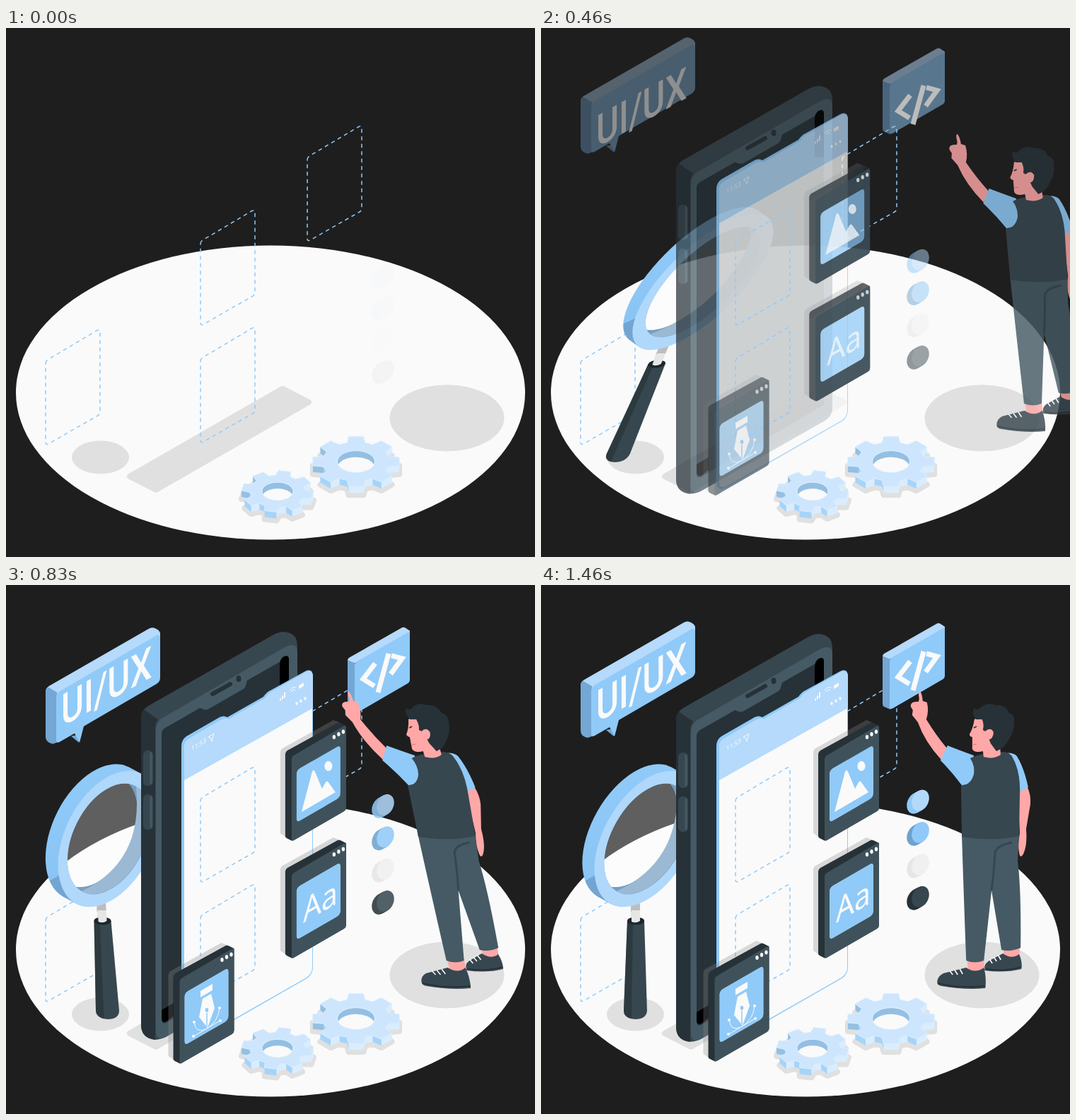
These frames come from a looping animation (748x748 px, 1.5 s). An HTML page:

```html
<!DOCTYPE html>
<html lang="en">
<head>
<meta charset="utf-8">
<title>App design</title>
<style>
html, body { margin: 0; height: 100%; overflow: hidden; background: #1e1e1e; }
svg { display: block; width: 100vw; height: 100vh; }
.fade, .up, .down, .layers > * { opacity: var(--eased); }
.up { transform: translateY(calc((1 - var(--eased)) * 45px)); }
.down { transform: translateY(calc((var(--eased) - 1) * 45px)); }
.right { transform: translateX(calc((var(--eased) - 1) * 45px)); }
.rise { opacity: var(--linear); transform: translateY(calc((1 - var(--linear)) * 45px)); }
.layers > .shade { opacity: calc(var(--eased) * .3); }
.skin { fill: #ffa8a7; }
.blue { fill: #90caf9; }
.pale { fill: #b5dafb; }
.dark { fill: #263238; }
.slate { fill: #37474f; }
.steel { fill: #455a64; }
.white { fill: #fafafa; }
.line { fill: none; stroke: #fafafa; }
</style>
</head>
<body>
<svg id="stage" viewBox="0 0 748 748">
  <defs>
    <path id="slot" d="M0 4q0-3 3-5L72-42q5-3 5 1V73q0 3-3 5L4 118q-4 2-4-2z"
      fill="none" stroke="#90caf9" stroke-width="1.5" stroke-dasharray="5.5 5"/>
    <g id="card" class="layers" fill-rule="evenodd">
      <path class="shade" fill="#888" d="M-7 41Q-7 38-4 36L68-4l8 3V8L0 50V161l-7-5z"/>
      <path class="dark" d="M0 44q0-3 3-5L74 0q2-1 4 0l8 4q0 20 0 116 0 3-3 5l-71 41q-2 1-4 0l-6-3q-2-1-2-3zM16 73V135q0 6 5 3l52-30q5-3 5-9V37q0-6-5-3L21 64q-5 3-5 9z"/>
      <path fill="#3f525b" d="M9 51q0-3 3-5L82 5q4-2 4 2V120q0 3-3 5l-71 41q-3 1-3-2zM16 73V135q0 6 5 3l52-30q5-3 5-9V37q0-6-5-3L21 64q-5 3-5 9z"/>
      <path class="blue" d="M16 73q0-6 5-9L73 34q5-3 5 3V99q0 6-5 9L21 138q-5 3-5-3z"/>
      <g class="white"><ellipse cx="69" cy="20" rx="2.2" ry="3"/><ellipse cx="75.500" cy="16" rx="2.2" ry="3"/><ellipse cx="82" cy="12.500" rx="2.2" ry="3"/></g>
    </g>
    <linearGradient id="ring" x2="0" y2="1">
      <stop stop-color="#90caf9"/><stop offset=".6" stop-color="#8ac4f5"/>
      <stop offset=".6" stop-color="#73a5d2"/><stop offset="1" stop-color="#73a5d2"/>
    </linearGradient>
  </defs>

  <ellipse class="white" cx="374" cy="515.500" rx="360" ry="208"/>
  <g fill="#e0e0e0" stroke="#e0e0e0" stroke-linejoin="round">
    <ellipse cx="133.500" cy="607" rx="40" ry="23"/>
    <ellipse cx="623.500" cy="551.500" rx="80.500" ry="46.500"/>
    <path stroke-width="8" d="M175 634L391 510 428 529 212 653z"/>
  </g>
  <g id="gears"></g>
  <use href="#slot" x="56" y="470"/>
  <use href="#slot" x="426" y="182"/>

  <g id="lens">
    <path fill="#e6e6e6" d="M127 450h13v29h-13z"/><path fill="#bdbdbd" d="M127 450h13v10l-13 2z"/>
    <path class="slate" d="M122 475Q134 467 146 475L150 602Q149 614 133 614 117 613 117 602z"/>
    <path class="dark" opacity=".6" d="M122 475l8 4-2 134q-11-3-11-11z"/>
    <ellipse cx="134" cy="475" rx="12" ry="5.500" fill="#1c262b"/>
    <path fill="#e6e6e6" d="M128 460h12v15q-6 4-12 1z"/>
    <g transform="matrix(.866 -.5 0 1 150 359)">
      <path fill="#fff" opacity=".29" d="M37.600-59.100A70 70 0 0 1-58.400 38.700 70 70 0 0 1 37.600-59.100z"/>
      <path fill="url(#ring)" fill-rule="evenodd" d="M60.200-61.400A86 86 0 0 1-60.200 61.400l-20.800-20.400A86 86 0 0 1 39.400-81.800zM37.600-59.100A70 70 0 0 1-58.400 38.700 70 70 0 0 1 37.600-59.100z"/>
      <path fill="#759fc4" d="M37.600-59.100A70 70 0 1 1-58.400 38.700 70 70 0 0 0 37.600-59.100z"/>
      <path fill="#9bb9d3" d="M49-50A70 70 0 0 1-50 49Q55 60 49-50z"/>
      <circle r="78" fill="none" stroke="#b0d8fb" stroke-width="16"/>
    </g>
  </g>

  <g class="up">
    <path class="slate" d="M191 190Q191 180 201 174L377 74Q392 65 405 73 412 77 412 90V523Q412 536 402 542L226 642Q212 649 201 643 191 638 191 625z"/>
    <path class="dark" d="M191 190Q191 184 195 179L215 193Q211 199 211 206V646Q191 644 191 625z"/>
    <path class="steel" d="M212 208Q212 197 221 191L394 91Q412 82 412 98V523Q412 536 402 542L226 642Q212 648 212 634z"/>
    <path class="dark" d="M220 214Q220 208 225 205L274 177 280 179Q284 180 287 178L334 151Q338 149 339 145L341 138 390 110Q400 104 400 113V520L228 621Q220 626 220 616z"/>
    <path d="M387 117V170H400V108Q400 101 393 104 387 107 387 117zM220 604l17-10v18l-10 8q-7 3-7-5z"/>
    <path d="M292 157L317 143" fill="none" stroke="#263238" stroke-width="6" stroke-linecap="round"/>
    <ellipse class="dark" cx="329" cy="135.500" rx="3.500" ry="4.500"/>
    <rect class="slate" x="194" y="237" width="14" height="50" rx="6"/>
    <rect class="slate" x="194" y="299" width="14" height="50" rx="6"/>
    <path d="M205 241v42M205 303v42" stroke="#455a64" stroke-width="3" stroke-linecap="round"/>
  </g>

  <g class="fade">
    <path class="blue" d="M248 228Q248 219 255 214L302 187Q308 184 313 187L364 158Q369 151 374 149L423 122Q434 117 434 130V541Q434 550 426 556L262 650Q248 656 248 642z"/>
    <path class="white" d="M252 230Q252 222 258 218L304 191Q310 188 315 190L367 160Q371 153 376 151L425 123Q433 120 433 130V541Q433 549 425 555L262 648Q252 652 252 642z"/>
    <path class="pale" d="M252 276V230Q252 222 258 218L304 191Q310 188 315 190L367 160Q371 153 376 151L425 123Q434 119 434 130V174z"/>
    <g class="white">
      <text transform="matrix(.866 -.5 0 1 262 235)" font-family="Noto Sans, sans-serif" font-size="9.500">11:53</text>
      <path d="M387 164v-3l2-1v3zM390 162v-5l2-1v5zM393 160v-8l2-1v8zM414 142l7-4v5l-7 4z"/>
      <ellipse cx="411" cy="167.500" rx="1.700" ry="2.200"/><ellipse cx="417" cy="164" rx="1.700" ry="2.200"/><ellipse cx="423" cy="160.500" rx="1.700" ry="2.200"/>
    </g>
    <path class="line" d="M286 215l8-5-3 11-2-5zM401 149q4-6 9-4M403 151q3-4 6-3"/>
  </g>
  <use href="#slot" x="275" y="301"/>
  <use href="#slot" x="275" y="467"/>

  <g class="right">
    <use href="#card" x="392" y="195"/>
    <use href="#card" x="392" y="361"/>
    <g class="layers white">
      <path d="M415 321L430 264Q432 260 434 264L444 288 449 279Q451 276 453 279L463 293z"/>
      <ellipse cx="453" cy="256" rx="5.500" ry="7"/>
      <text transform="matrix(.866 -.5 0 1 417 478)" font-family="Noto Sans, sans-serif" font-size="47">Aa</text>
    </g>
  </g>
  <g class="down">
    <use href="#card" x="236.500" y="507"/>
    <path class="white" d="M275 571l17-10v9l-17 10zM278 582l12-7 5 20-10 28-12-15z"/>
    <path d="M284 621V602" stroke="#90caf9" stroke-width="1.500"/>
    <ellipse class="blue" cx="284" cy="598" rx="2.300" ry="3"/>
    <path class="line" d="M264 636L303 613M266 615Q268 632 283 625 300 615 302 595"/>
    <g class="white"><circle cx="265" cy="635" r="2"/><circle cx="303" cy="613" r="2"/><circle cx="266" cy="615" r="2"/><circle cx="302" cy="595" r="2"/></g>
  </g>

  <g class="down"><g class="down">
    <g class="down">
      <path class="pale" d="M56 142Q56 137 61 134L202 53Q207 50 212 53 218 56 218 60V72L71 146z"/>
      <path fill="#74a7d4" d="M56 142Q56 138 60 136L72 143V214L66 216Q56 214 56 206z"/>
      <path fill="#74a7d4" d="M92 205l11 9 4-12z"/>
      <path class="blue" d="M71 150Q71 145 75 142L212 63Q218 60 218 66V122Q218 128 213 131L110 191 104 214 97 201 76 213Q71 216 71 210z"/>
    </g>
    <text class="white" transform="matrix(.78 -.43 0 1 78 195)" font-family="Roboto, sans-serif" font-size="63" font-weight="500">UI/UX</text>
  </g></g>

  <g class="down">
    <g class="down">
      <path class="pale" d="M483 101Q483 98 487 96L559 55Q562 53 565 55L571 59V70L493 105z"/>
      <path fill="#74a7d4" d="M483 101l11 4v71l-9-4q-2-1-2-4z"/>
      <path class="blue" d="M493 109Q493 105 497 102L567 62Q571 59 571 64V128Q571 132 567 134L498 174Q493 177 493 172z"/>
    </g>
    <path class="line" stroke-width="7" d="M522 108L505 130 521 140M526 149L541 94M545 97L560 101 544 123"/>
  </g>
  <g class="rise" id="swatches"></g>

  <g id="person">
    <path class="skin" d="M653 511L677 510 676 530 655 530zM602 528L626 527 627 549 604 548z"/>
    <path class="slate" d="M627 541Q627 534 636 530L653 521Q665 530 676 522 681 534 679 543 655 549 627 545z"/>
    <path class="slate" d="M560 562Q560 553 569 549L601 541Q614 550 626 541 630 555 628 570 600 573 566 567 560 566 560 562z"/>
    <path fill="none" stroke="#263238" stroke-width="2" d="M561 563Q590 571 628 567M629 543Q655 547 679 540"/>
    <path class="line" stroke-width="1.600" d="M578 546l4 5M585 545l4 6M592 543l4 7M634 529l4 6M640 526l4 6M646 523l4 7"/>
    <path class="steel" d="M595 352H676L674 390Q679 430 678 513 664 519 651 516L637 432 626 531Q613 536 601 531 598 450 595 352z"/>
    <path fill="none" stroke="#37474f" stroke-width="3" d="M666 364Q645 368 642 378 641 400 637 432"/>
    <path class="skin" d="M674 289L688 286Q693 297 692 310L686 345Q688 370 681 382 677 387 676 378 674 370 677 350z"/>
    <path class="blue" d="M655 238Q668 236 673 242 683 258 689 286 682 291 674 292z"/>
    <path class="skin" d="M575 232Q559 213 545 190 549 178 546 166L540 164Q539 153 536 150 533 150 535 161L534 165Q522 164 523 172L526 177 525 184Q530 190 533 194 543 222 566 247z"/>
    <path class="blue" d="M575 227Q590 233 612 241L614 272Q608 284 595 283 580 263 565 248z"/>
    <path class="slate" d="M607 245Q614 241 625 239L650 236Q663 235 667 244 679 265 677 300L676 355Q640 363 595 356L594 283Q607 284 612 268 614 255 607 245z"/>
    <path class="skin" d="M613 190Q611 203 606 211 606 214 610 215L610 232Q613 238 625 235L626 243Q640 247 650 240L649 224 656 195 630 178z"/>
    <path class="dark" d="M615 190Q608 180 613 174 616 177 619 176 630 164 643 170 656 168 662 181 671 183 669 196 669 207 663 216 657 230 644 235L636 224 630 208 625 205Q627 198 624 190z"/>
    <path class="skin" d="M628 207Q636 200 640 208 640 218 632 219 627 218 628 207z"/>
    <path fill="none" stroke="#263238" stroke-width="1.500" d="M612 202l4-2"/>
    <path fill="none" stroke="#e57373" d="M611 226l5-1"/>
  </g>
</svg>
<script>
const byId = id => document.getElementById(id);
const poly = (points, attrs) => `<polygon points="${points.join(' ')}" ${attrs}/>`;

// Extruded gear lying on the floor, seen isometrically.
function gear(cx, cy, radius, hole, turn) {
  const depth = 9, flat = .577, points = [];
  for (let k = 0; k < 8; k++)
    for (const [da, r] of [[-.27, .77], [-.17, 1], [.17, 1], [.27, .77]]) {
      const a = turn + k * Math.PI / 4 + da;
      points.push([cx + radius * r * Math.sin(a), cy - radius * r * flat * Math.cos(a)]);
    }
  const low = (p, d) => [p[0], p[1] + d];
  const sides = points.map((p, i) => [p, points[(i + 1) % points.length]])
    .filter(([p, q]) => q[0] < p[0])
    .sort((m, n) => m[0][1] + m[1][1] - n[0][1] - n[1][1])
    .map(([p, q]) => {
      const nx = (q[1] - p[1]) / Math.hypot(q[0] - p[0], q[1] - p[1]);
      const left = p[0] < cx - radius * .4 && p[1] < cy + radius * .2;
      const fill = left ? '#94c0e4' : nx > -.1 ? '#d9edfe' : '#a6d4f9';
      return poly([p, q, low(q, depth), low(p, depth)], `fill="${fill}"`);
    });
  const ry = hole * flat, x = hole * Math.sqrt(1 - (depth / 2 / ry) ** 2);
  return poly(points.map(p => low(p, 12)), 'fill="#e0e0e0" stroke="#e0e0e0" stroke-width="8" stroke-linejoin="round"')
    + sides.join('') + poly(points, 'fill="#cde6fd" stroke="#dceefe"')
    + `<ellipse cx="${cx}" cy="${cy}" rx="${hole}" ry="${ry}" fill="#94bfe3" stroke="#e3f2fd"/>`
    + `<path class="white" d="M${cx - x} ${cy + depth / 2}a${hole} ${ry} 0 0 1 ${2 * x} 0a${hole} ${ry} 0 0 1 ${-2 * x} 0z"/>`;
}
byId('gears').innerHTML = gear(495, 613, 62, 26.5, 0) + gear(384, 655, 51, 22, .2);

// Coloured discs standing in the wall plane.
const disc = (x, y, fill) => `<ellipse rx="11.5" ry="15.5" fill="${fill}" transform="translate(${x} ${y}) rotate(24)"/>`;
byId('swatches').innerHTML = [['#90caf9', '#b3d9fa'], ['#6fa2cd', '#90caf9'], ['#e6e6e6', '#f0f0f0'], ['#263238', '#37474f']]
  .map(([side, face], i) => {
    let html = '';
    for (let s = 0; s <= 7; s++) html += disc(529.5 + s, 308.5 - s * .57 + i * 45.4, s < 7 ? side : face);
    return html;
  }).join('');

const mix = (a, b, p) => a + (b - a) * p;
const tan = deg => Math.tan(deg * Math.PI / 180);

// cubic-bezier(.36, -.01, .5, 1.38)
function ease(x) {
  if (x >= 1) return 1;
  const curve = (a, b, s) => 3 * a * s * (1 - s) ** 2 + 3 * b * s * s * (1 - s) + s ** 3;
  let lo = 0, hi = 1;
  for (let i = 0; i < 24; i++) {
    const mid = (lo + hi) / 2;
    if (curve(.36, .5, mid) < x) lo = mid; else hi = mid;
  }
  return curve(-.01, 1.38, lo);
}

// Fly in sideways while leaning, swing back and settle.
function rush(el, p, distance, originY, [start, swing, rebound]) {
  let shift = 0, lean, opacity = 1;
  if (p < .6) {
    const e = ease(p / .6);
    shift = distance * (1 - e);
    lean = mix(tan(start), tan(swing), e);
    opacity = Math.min(1, Math.max(0, e));
  } else if (p < .8) lean = tan(mix(swing, rebound, ease((p - .6) / .2)));
  else lean = mix(tan(rebound), 0, ease((p - .8) / .2));
  el.setAttribute('transform', `matrix(1 0 ${lean} 1 ${shift - lean * originY} 0)`);
  el.setAttribute('opacity', opacity);
}

const LOOP = 1500, FPS = 24;
const stage = byId('stage'), lens = byId('lens'), person = byId('person');
const begin = performance.now();

function draw(now) {
  const ms = Math.max(0, now - begin) % LOOP;
  const step = Math.min(35, Math.floor(ms * FPS / 1000 + .1));
  const t = (step + .65) / FPS;
  stage.style.setProperty('--eased', ease(t));
  stage.style.setProperty('--linear', Math.min(1, t));
  rush(lens, t, -748, 432, [30, -20, 5]);
  rush(person, t / 1.5, 374, 361, [-20, 10, -2]);
  requestAnimationFrame(draw);
}
draw(begin);
</script>
</body>
</html>
```
